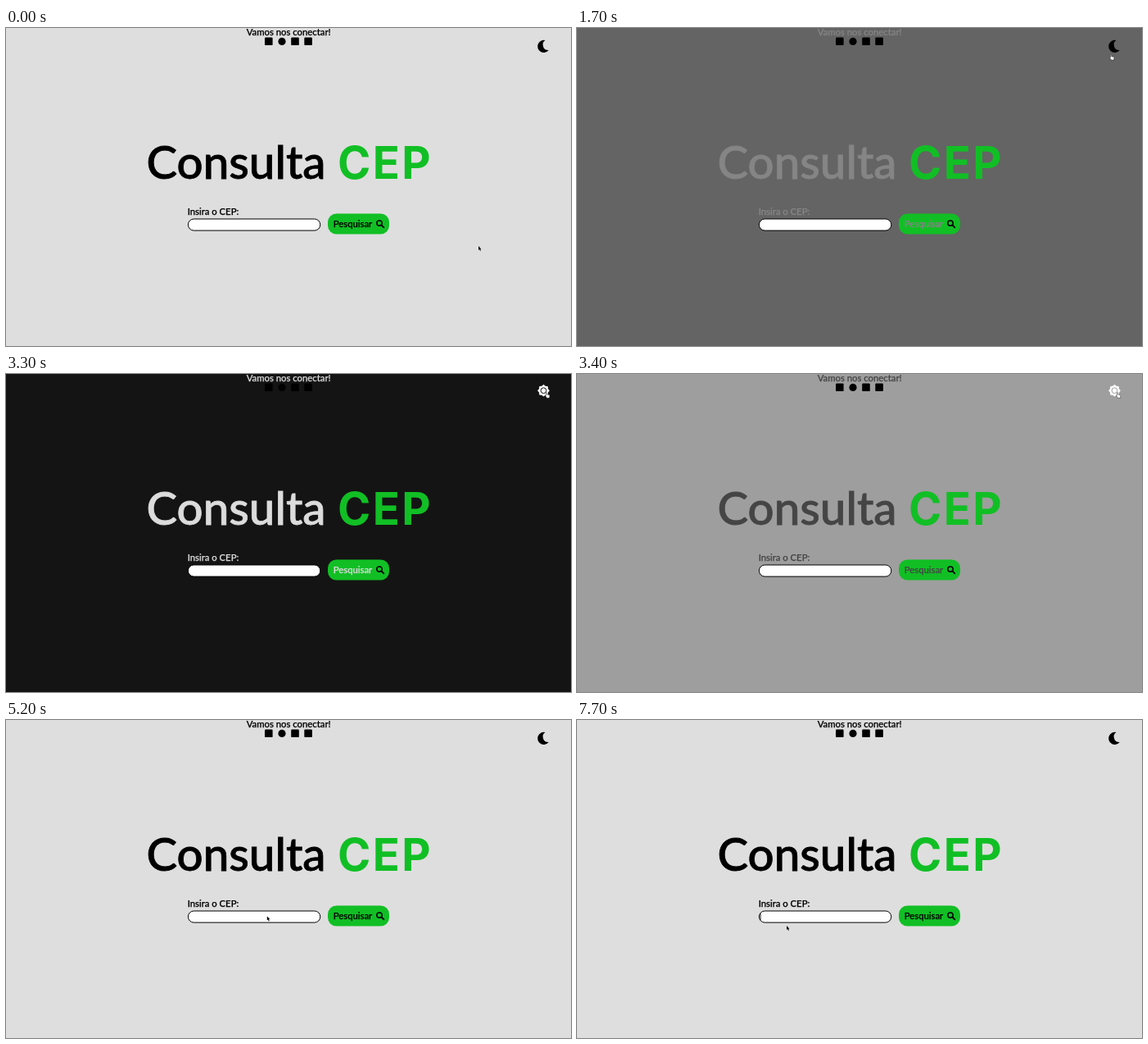
Animation of 690x388 px, one loop 8 s. Source, as an HTML page:

```html
<!DOCTYPE html>
<html lang="pt-BR">
<head>
<meta charset="utf-8">
<title>Consulta CEP</title>
<style>
  html, body { margin: 0; width: 100%; height: 100%; overflow: hidden; }
  svg { display: block; width: 690px; height: 388px; background: var(--bg); }
  text { font: 500 11.3px Lato, "Open Sans", sans-serif; fill: var(--ink); stroke: var(--ink); stroke-width: .25px; text-anchor: middle; }
  .title { font-size: 56.5px; stroke-width: .8px; }
  .cep { font: 700 54.5px Inter, "Open Sans", sans-serif; letter-spacing: 2.5px; fill: #11bf25; stroke: none; }
</style>
</head>
<body>
<svg viewBox="0 0 690 388">
  <text x="345.2" y="9.3">Vamos nos conectar!</text>
  <rect x="316" y="11.5" width="9.6" height="9.6" rx="1.2"/>
  <circle cx="337" cy="16.4" r="4.6"/>
  <rect x="348.2" y="11.5" width="9.6" height="9.6" rx="1.2"/>
  <rect x="364.3" y="11.5" width="9.6" height="9.6" rx="1.2"/>

  <path id="moon" d="M658.5 15A7.6 7.6 0 1 0 662.8 27A6.6 6.6 0 0 1 658.5 15Z"/>
  <g id="sun" transform="translate(656.5 20.2)" fill="#fff">
    <path id="rays"/>
    <circle r="3.4" fill="none" stroke="var(--bg)"/>
  </g>

  <text class="title" x="281" y="184.4">Consulta</text>
  <text class="cep" x="463" y="184.2">CEP</text>

  <text x="253" y="227.5">Insira o CEP:</text>
  <rect x="222.4" y="233" width="161.4" height="14.1" rx="7" fill="#fff" stroke="#000"/>
  <rect id="caret" x="223.6" y="236" width=".9" height="8"/>

  <rect x="393" y="226.5" width="75" height="25" rx="10.5" fill="#11bf25"/>
  <text x="423.5" y="242.7">Pesquisar</text>
  <path d="M458.7 240.7L461.3 243.3" stroke="#000" stroke-width="1.9" stroke-linecap="round"/>
  <circle cx="456" cy="238.1" r="3.2" fill="none" stroke="#000" stroke-width="1.5"/>

  <path id="arrow" stroke="#fff" stroke-width=".5" paint-order="stroke"
        d="M0 0V5L1.2 4L2 6L3 5.5L2.2 3.7H3.5Z"/>
  <path id="hand" fill="#fff" stroke="#222" stroke-width=".5"
        d="M1 0Q1.7 0 1.7 .7V2.5L4.3 3Q5 3.2 5 4L4.5 6.8H1.6L-.3 4.2Q0 3.5 .4 3.8V.7Q.4 0 1 0Z"/>
</svg>
<script>
const LOOP = 8000, STEP = 100, FADE = 260;
const DARKEN = 1610, LIGHTEN = 3295, FOCUS = 5700;
const $ = id => document.getElementById(id);

// Cursor moves: begin, end, then the point reached
const home = [577, 266];
const moves = [
  [400, 1200, 651, 32.3],
  [2800, 3000, 659, 22.5],
  [4200, 4900, 338, 239],
  [4950, 5800, 246, 241],
  [5900, 6200, 256, 251]
];

const progress = (t, begin, end) => Math.min(1, Math.max(0, (t - begin) / (end - begin)));
const smooth = u => u * u * (3 - 2 * u);

// The CSS "ease" curve, solved by bisection
function ease(u) {
  let low = 0, high = 1, s = .5;
  for (let i = 0; i < 20; i++) {
    if (.75 * s * (1 - s) + s ** 3 < u) low = s; else high = s;
    s = (low + high) / 2;
  }
  return .3 * s * (1 - s) ** 2 + 3 * s * s * (1 - s) + s ** 3;
}
const fade = (t, begin) => ease(progress(t, begin, begin + FADE));

function cursorAt(t) {
  let [x, y] = home;
  for (const [begin, end, toX, toY] of moves) {
    const u = smooth(progress(t, begin, end));
    x += (toX - x) * u;
    y += (toY - y) * u;
  }
  return [x, y];
}

const show = (id, on) => $(id).style.display = on ? "" : "none";
const gray = v => `rgb(${v},${v},${v})`;

const points = Array.from({ length: 16 }, (_, i) => {
  const r = i % 2 ? 5.9 : 7.4, a = i * Math.PI / 8;
  return [r * Math.cos(a), r * Math.sin(a)];
});
$("rays").setAttribute("d", "M" + points.join("L") + "Z");

function draw(now) {
  const t = Math.floor(now % LOOP / STEP) * STEP;
  const dark = fade(t, DARKEN) - fade(t, LIGHTEN);
  const root = document.documentElement.style;
  root.setProperty("--bg", gray(Math.round(222 - 204 * dark)));
  root.setProperty("--ink", gray(Math.round(222 * dark)));

  // The icon swaps once the fade is over
  const sunny = t >= DARKEN + FADE && t < LIGHTEN + FADE;
  show("sun", sunny);
  show("moon", !sunny);
  show("caret", t >= FOCUS && (t - FOCUS) % 1000 < 500);

  const pointing = t >= 1200 && t < 4300;
  show("hand", pointing);
  show("arrow", !pointing);
  $(pointing ? "hand" : "arrow").setAttribute("transform", `translate(${cursorAt(t)})`);
}

const start = performance.now();
function tick() {
  draw(performance.now() - start);
  requestAnimationFrame(tick);
}
tick();
</script>
</body>
</html>
```
